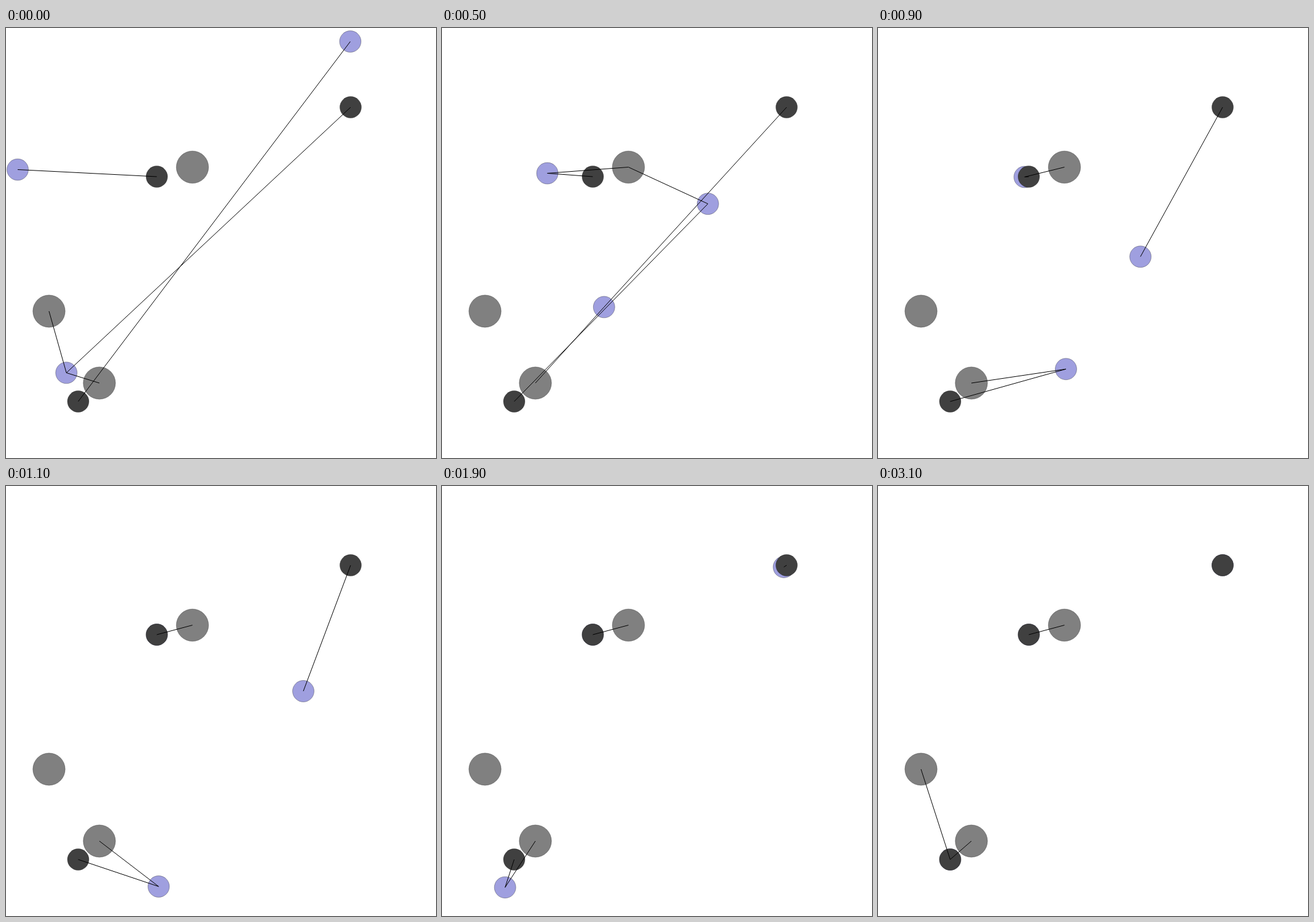
Recreate the animation shown at these times as an HTML page with a canvas. Size 700 px wide and 700 px high, loop 4 s.

```html
<!DOCTYPE html>
<html lang="en">
<head>
<meta charset="utf-8">
<title>Agents and obstacles</title>
<style>
  html, body { margin: 0; width: 100%; height: 100%; overflow: hidden; background: #fff; }
  canvas { display: block; width: 700px; height: 700px; }
</style>
</head>
<body>
<canvas id="stage" width="700" height="700"></canvas>
<script>
const ctx = document.getElementById('stage').getContext('2d');
const LOOP = 4000, STEP = 100, LAST_STEP = 31;
const RADIUS = 17.5, SENSE_RANGE = 170;

const point = (x, y) => ({ x, y });
const obstacles = [point(303.5, 226.5), point(70, 461), point(152, 578)];

// Every agent passes its waypoints at these shared steps, then rests on its goal.
const keySteps = [0, 3, 7, 11, 15, 16, 18, 23, LAST_STEP];
const agent = (...path) => ({ path, goal: path[path.length - 1] });
const agents = [
  agent(point(19, 230.5), point(102, 230), point(222, 243), point(245.5, 242)),
  agent(point(560.5, 22), point(498.5, 159), point(362, 421), point(248.5, 652),
        point(97, 712.5), point(89.5, 708), point(98, 670), point(118, 605.3), point(117.5, 608)),
  agent(point(98.3, 561.3), point(177, 501.5), point(355, 408), point(484, 334),
        point(550.5, 209.5), point(554.5, 174), point(555.5, 133.5), point(561, 129))
];

// Velocity at a waypoint: harmonic mean of its neighbouring speeds, so nothing overshoots.
function velocity(path, i, axis) {
  const speed = j => (path[j + 1][axis] - path[j][axis]) / (keySteps[j + 1] - keySteps[j]);
  if (i === 0) return 0.7 * speed(0);
  if (i === path.length - 1) return 0;
  const before = speed(i - 1), after = speed(i);
  return before * after > 0 ? 2 * before * after / (before + after) : 0;
}

function positionAt({ path, goal }, step) {
  if (step >= keySteps[path.length - 1]) return goal;
  const i = keySteps.findIndex(key => key > step) - 1;
  const span = keySteps[i + 1] - keySteps[i];
  const u = (step - keySteps[i]) / span, v = 1 - u;
  const hermite = axis =>
    v * v * (1 + 2 * u) * path[i][axis] + u * u * (1 + 2 * v) * path[i + 1][axis] +
    span * u * v * (v * velocity(path, i, axis) - u * velocity(path, i + 1, axis));
  return point(hermite('x'), hermite('y'));
}

function disc({ x, y }, radius, fill) {
  ctx.beginPath();
  ctx.arc(x, y, radius, 0, 2 * Math.PI);
  ctx.fillStyle = fill;
  ctx.fill();
  ctx.strokeStyle = 'rgba(0,0,0,0.3)';
  ctx.stroke();
}

function link(a, b) {
  ctx.strokeStyle = '#000';
  ctx.beginPath();
  ctx.moveTo(a.x, a.y);
  ctx.lineTo(b.x, b.y);
  ctx.stroke();
}

const near = (a, b) => Math.hypot(a.x - b.x, a.y - b.y) < SENSE_RANGE;

function draw(step) {
  const spots = agents.map(a => positionAt(a, step));
  ctx.clearRect(0, 0, 700, 700);
  spots.forEach(spot => disc(spot, RADIUS, 'rgba(64,64,192,0.5)'));
  obstacles.forEach(spot => disc(spot, RADIUS * 1.5, '#808080'));
  agents.forEach(({ goal }) => disc(goal, RADIUS, '#404040'));
  spots.forEach((spot, i) => {
    link(spot, agents[i].goal);
    [...obstacles, ...spots.slice(i + 1)]
      .filter(other => near(spot, other))
      .forEach(other => link(spot, other));
  });
}

const start = performance.now();

function tick(now) {
  const elapsed = Math.max(0, now - start) % LOOP;
  draw(Math.min(LAST_STEP, Math.floor(elapsed / STEP)));
  requestAnimationFrame(tick);
}
tick(start);
</script>
</body>
</html>
```
